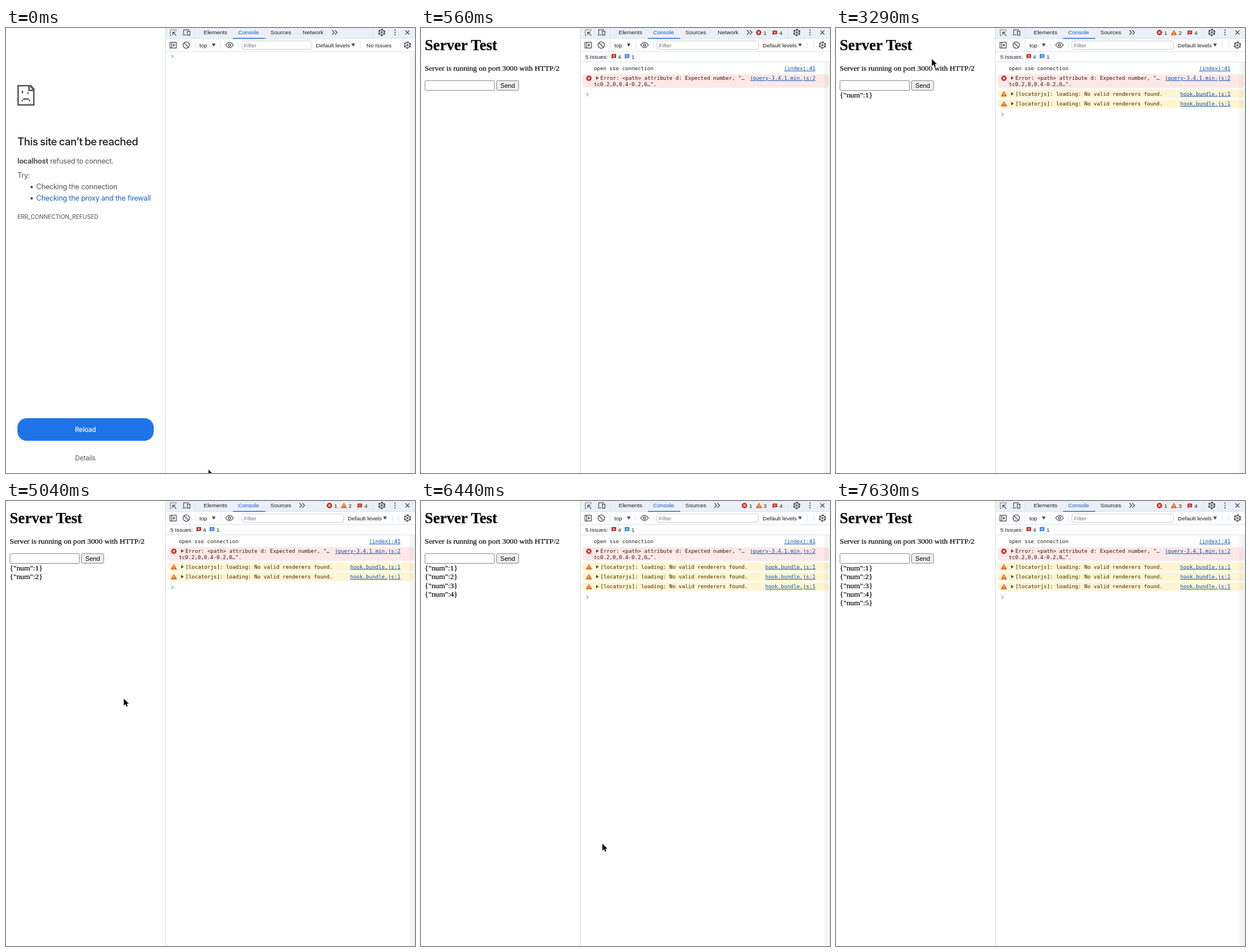
Recreate the animation shown at these times as an HTML page. Size 717x781 px, loop 8 s.

```html
<!DOCTYPE html>
<html lang="en">
<head>
<meta charset="utf-8">
<title>Server test</title>
<style>
  html, body { margin: 0; width: 100%; height: 100%; overflow: hidden; background: #fff; }
  svg { display: block; width: 717px; height: 781px; }
  text { white-space: pre; }
  .ui { font: 9.96px "Liberation Sans", Arial, sans-serif; fill: #1f1f1f; }
  .mono { font: 9.13px "DejaVu Sans Mono", Menlo, monospace; fill: #1f1f1f; }
  .link { fill: #0b4bb3; text-decoration: underline; text-anchor: end; }
  .err { fill: #410e0b; }
  .warn { fill: #421f00; }
  .page { font: 13.28px "Liberation Serif", Times, serif; fill: #000; stroke: #000; stroke-width: .2; }
  .h1 { font-size: 26.56px; font-weight: 700; }
  .net { font: 12.45px Inter, sans-serif; letter-spacing: -.2px; fill: #4f5256; }
  .title { font-size: 18.4px; font-weight: 500; letter-spacing: -.43px; word-spacing: -.9px; fill: #1b1c1e; }
  .proxy { fill: #1a5fc0; }
  .code { font-size: 10.06px; letter-spacing: 0; }
  .mid { font-size: 11.2px; letter-spacing: 0; text-anchor: middle; }
  .reload { fill: #fff; font-weight: 500; }
  .send { font-size: 11.07px; fill: #000; }
  .active { fill: #0b57d0; }
  .hint { fill: #757575; }
  .icon { fill: none; stroke: #474747; stroke-width: 1.25; }
  .teeth { stroke-width: 1.9; stroke-dasharray: 3.2 2.45; }
  .sep { stroke: #d3e3fd; stroke-width: 1; }
</style>
</head>
<body>
<svg id="stage" viewBox="0 0 717 781" xmlns="http://www.w3.org/2000/svg"></svg>
<script>
const LOOP = 8000, STEP = 70;
const PAGE = 210, SSE = 350, ERROR = 490;
const WARN = [1330, 2240, 5320];
const COUNT = [1330, 2310, 5390];
const NUMS = [3290, 4340, 5390, 6440, 7490];

// Cursor tip: [time, x, y]; null x hides it.
const PATH = [
  [0, 355, 775], [70, null],
  [1190, 145, 3], [1470, 159, 58], [1610, 159, 58], [1890, 168, 54.5],
  [4690, 168, 54.5], [4900, 204, 338], [5040, 206.5, 347],
  [5460, 318, 601.5], [6510, 318, 601.5], [7350, 348, 767],
  [7560, 351, 778], [7630, null]
];

const span = (on, off, body) => `<g data-on="${on}" data-off="${off}">${body}</g>`;
const esc = s => s.replace(/&/g, '&amp;').replace(/</g, '&lt;');
const text = (cls, x, y, s) => `<text class="${cls}" x="${x}" y="${y}">${esc(s)}</text>`;
const rect = (x, y, w, h, fill, rx = 0, extra = '') =>
  `<rect x="${x}" y="${y}" width="${w}" height="${h}" rx="${rx}" fill="${fill}" ${extra}/>`;
const icon = (d, extra = '') => `<path class="icon" d="${d}" ${extra}/>`;
const sep = (x, y, h) => `<path class="sep" d="M${x} ${y}v${h}"/>`;
const hline = y => `<path class="sep" d="M279 ${y}H717"/>`;
const at = (x, y, body) => `<g transform="translate(${x} ${y})">${body}</g>`;
const down = (x, y) => `<path d="M${x} ${y}h6.4l-3.2 5.6z" fill="#474747"/>`;
const right = y => `<path d="M307 ${y - 3}v6l4.6-3z" fill="#474747"/>`;

const gear = (x, y) => at(x, y,
  `<circle class="icon" r="4.3"/><circle class="icon" r="1.4"/>
   <circle class="icon teeth" r="5.4" transform="rotate(13)"/>`);

const errIcon = (x, y) => at(x, y,
  `<circle r="4.7" fill="#c5291f"/><path d="M-1.8-1.8 1.8 1.8M1.8-1.8-1.8 1.8" stroke="#fff" stroke-width="1.2"/>`);

const warnIcon = (x, y) => at(x, y,
  `<path d="M0-4.6 5 4.2H-5z" fill="#e2661b" stroke="#e2661b" stroke-width=".6" stroke-linejoin="round"/>
   <path d="M0-1.8V1.2M0 2v1.2" stroke="#fff" stroke-width="1.1"/>`);

const bubble = (x, y, fill, mark) => at(x, y,
  `<path d="M-4-4H4V2.6H-2.2L-4 4.4z" fill="${fill}"/><path d="${mark}" stroke="#fff" fill="none"/>`);
const breaking = (x, y) => bubble(x, y, '#c5291f', 'M-1.5-2.2 1.5.8M1.5-2.2-1.5.8');
const info = (x, y) => bubble(x, y, '#1a73e8', 'M-2.4-1.8H2.4M-2.4.4H2.4');

const more = x => icon(`M${x - 4.5} 3.8l4 4-4 4M${x + .5} 3.8l4 4-4 4`);
const prompt = (on, off, y) => span(on, off,
  `<path d="M290 ${y - 2.9}l3.2 2.9-3.2 2.9" fill="none" stroke="#7d9fd2" stroke-width="1.2"/>`);

function errorPage() {
  const unit = (x, y, w = 2.5, h = 2.5) => rect(x, y, w, h, '#535353');
  return `<path d="M40 101.2H21.2V134.9H48.8V109.5H40.2V101.2H43.7V103.8H46.2V106.4H48.8V110" fill="none" stroke="#535353" stroke-width="2.5"/>` +
    unit(27.5, 110, 2.5, 4.5) + unit(37.5, 113, 2.5, 2.5) +
    unit(30, 123.4, 10) + unit(27.5, 126) + unit(40, 126) +
    text('net title', 20, 206, 'This site can’t be reached') +
    `<text class="net" x="20" y="237.6"><tspan font-weight="700">localhost</tspan> refused to connect.</text>` +
    text('net', 20, 263.2, 'Try:') +
    [279, 299].map(y => `<circle cx="45" cy="${y}" r="2.2" fill="#4f5256"/>`).join('') +
    text('net', 53, 283.1, 'Checking the connection') +
    text('net proxy', 53, 303.1, 'Checking the proxy and the firewall') +
    text('net code', 20, 334.6, 'ERR_CONNECTION_REFUSED') +
    rect(20, 684.7, 239, 39.84, '#1f73e8', 16.6) +
    text('net mid reload', 139.3, 708.8, 'Reload') +
    text('net mid', 139.3, 758.7, 'Details');
}

function serverPage() {
  const edge = 'stroke="#767676" stroke-width=".9"';
  return text('page h1', 6.6, 38.6, 'Server Test') +
    text('page', 6.6, 75.3, 'Server is running on port 3000 with HTTP/2') +
    rect(7, 92.3, 121.6, 17.2, '#fff', 1.5, edge) +
    rect(132.4, 92.3, 38.8, 17, '#efefef', 2.5, edge) +
    text('ui send', 139, 104.6, 'Send') +
    NUMS.map((t, i) => span(t, LOOP, text('page', 6.6, 121.9 + 15.35 * i, `{"num":${i + 1}}`))).join('');
}

function tabBar() {
  const warned = COUNT[0];
  return rect(279, 0, 438, 18.5, '#ebf0f8') + hline(18.5) +
    icon('M288 13V3H298V6', 'stroke-dasharray="1.6 1.2"') + icon('M288 13H291', 'stroke-dasharray="1.6 1.2"') +
    icon('M292.5 7.5 298.5 13.5M292.3 12V7.3H297') +
    icon('M311.5 10.5V3.2H321M309.5 12.2H316M318 5.6H322.4V12.6H318z') +
    sep(331.5, 2, 12) +
    text('ui', 346.5, 11.3, 'Elements') +
    text('ui active', 407, 11.3, 'Console') +
    rect(398, 17.6, 56.5, 1.3, '#0b57d0') +
    text('ui', 463.5, 11.3, 'Sources') +
    span(0, warned, text('ui', 520, 11.3, 'Network') + more(576)) +
    span(warned, LOOP, more(519)) +
    span(ERROR, warned, errIcon(592, 8) + text('ui', 600.3, 11.8, '1')) +
    span(warned, LOOP, errIcon(567, 8) + text('ui', 575.3, 11.8, '1') + warnIcon(592.3, 8)) +
    COUNT.map((t, i) => span(t, COUNT[i + 1] || LOOP, text('ui', 600.5, 11.8, `${i + 1}`))).join('') +
    span(ERROR, LOOP, breaking(620.3, 8.5) + text('ui', 628.3, 11.8, '4')) +
    sep(643.5, 2, 12) + gear(658.7, 7.8) +
    [3.6, 7.7, 11.8].map(y => `<circle cx="682" cy="${y}" r="1.15" fill="#474747"/>`).join('') +
    icon('M700.2 4.2l7 7M707.2 4.2l-7 7');
}

function toolbar() {
  const filter = w => rect(413.5, 22.8, w, 14.6, '#fff', 3, 'stroke="#c7cbd1"') +
    text('ui hint', 417, 33.7, 'Filter');
  const levels = x => text('ui', x, 33.6, 'Default levels') + down(x + 62.3, 27.2);
  return icon('M287.5 25.2H298.5V35H287.5zM290.6 25.2V35') +
    '<path d="M293 27.4v5.4l3.6-2.7z" fill="#474747"/>' +
    '<circle class="icon" cx="316" cy="30" r="5.6"/>' + icon('M312 26l8 8') +
    sep(331.5, 24, 12) + text('ui', 339, 33.6, 'top') + down(361, 27.2) + sep(376.5, 24, 12) +
    icon('M385 30Q391.8 20.8 398.6 30Q391.8 39.2 385 30z') + '<circle class="icon" cx="391.8" cy="30" r="2"/>' +
    sep(407.5, 24, 12) +
    span(0, ERROR, filter(121.5) + levels(543.2) + sep(621.5, 24, 12) + text('ui', 631.8, 33.6, 'No Issues') + sep(691.5, 24, 12)) +
    span(ERROR, LOOP, filter(178) + levels(599) + sep(677.5, 24, 12) + sep(688.5, 24, 12)) +
    gear(703.7, 30) + hline(41.5);
}

function consoleRows() {
  const sse = y => text('mono', 303, y, 'open sse connection') + text('mono link', 691.5, y, '(index):41');
  const warning = i => {
    const y = 108 + 17.4 * i;
    return rect(283, y, 432, 14.8, '#fef5d3', 5) + warnIcon(294.3, y + 7.7) + right(y + 7.4) +
      text('mono warn', 314.5, y + 10.6, '[locatorjs]: loading: No valid renderers found.') +
      text('mono link', 691.5, y + 10.6, 'hook.bundle.js:1');
  };
  return span(SSE, ERROR, sse(56.3)) +
    span(ERROR, LOOP,
      text('ui', 288, 53.6, '5 Issues:') + breaking(338, 49.8) + text('ui', 345.3, 53.6, '4') +
      info(361.3, 49.8) + text('ui', 369, 53.6, '1') + hline(59.5) + sse(74) +
      rect(283, 81, 432, 24, '#fce9e7', 5) + errIcon(294.3, 88.3) + right(87.8) +
      text('mono err', 314.5, 91, 'Error: <path> attribute d: Expected number, "…') +
      text('mono err', 303, 101.9, 'tc0.2,0,0.4-0.2,0…".') +
      text('mono link', 691.5, 91, 'jquery-3.4.1.min.js:2')) +
    WARN.map((t, i) => span(t, LOOP, warning(i))).join('') +
    prompt(0, SSE, 50) + prompt(SSE, ERROR, 67.5) + prompt(ERROR, WARN[0], 116.8) +
    WARN.map((t, i) => prompt(t, WARN[i + 1] || LOOP, 134.2 + 17.4 * i)).join('') +
    span(0, ERROR, gutter(42)) + span(ERROR, LOOP, gutter(60));
}

function gutter(y) {
  return rect(707, y, 10, 781 - y, 'rgba(0,0,0,.035)') + rect(715.5, y, 1.5, 781 - y, 'rgba(0,0,0,.05)');
}

const stage = document.getElementById('stage');
stage.innerHTML = span(0, PAGE, errorPage()) + span(PAGE, LOOP, serverPage()) +
  rect(279, 0, 438, 781, '#fff') + tabBar() + toolbar() + consoleRows() +
  '<path d="M279.5 0V781" stroke="#d5dae2"/>' +
  `<path id="cursor" d="M0 0V12.2L2.8 9.6 4.7 13.8 6.9 12.9 5.1 8.8H8.8z" fill="#000" stroke="#fff" stroke-width="1.4" paint-order="stroke"/>`;

const spans = [...stage.querySelectorAll('[data-on]')].map(el => ({ el, on: +el.dataset.on, off: +el.dataset.off }));
const cursor = document.getElementById('cursor');

function cursorAt(t) {
  const i = PATH.findLastIndex(p => p[0] <= t);
  const [t0, x0, y0] = PATH[i];
  if (x0 === null) return null;
  const [t1, x1, y1] = PATH[i + 1];
  if (x1 === null) return [x0, y0];
  const k = (t - t0) / (t1 - t0);
  return [x0 + (x1 - x0) * k, y0 + (y1 - y0) * k];
}

function draw(now) {
  const t = Math.floor((now % LOOP) / STEP) * STEP;
  for (const { el, on, off } of spans) el.style.display = t >= on && t < off ? '' : 'none';
  const tip = cursorAt(t);
  cursor.style.display = tip ? '' : 'none';
  if (tip) cursor.setAttribute('transform', `translate(${tip})`);
}

const start = performance.now();
function tick() {
  draw(performance.now() - start);
  requestAnimationFrame(tick);
}
tick();
</script>
</body>
</html>
```
